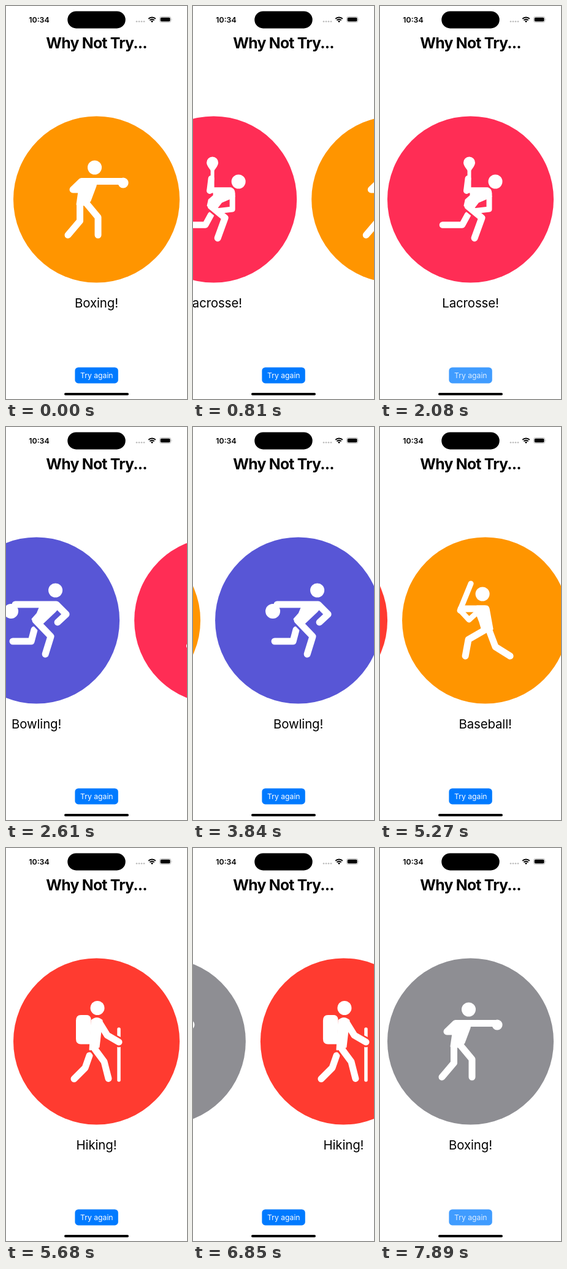
These frames come from a looping animation (295x640 px, 8 s). An HTML page:

```html
<!DOCTYPE html>
<html lang="en">
<head>
<meta charset="utf-8">
<title>Why Not Try...</title>
<style>
html, body { margin: 0; width: 100%; height: 100%; overflow: hidden; background: #fff; }
svg { display: block; width: 100vw; height: 100vh; }
text { font-family: Inter, Roboto, sans-serif; font-optical-sizing: none; text-anchor: middle; }
.line { fill: none; stroke: #fff; stroke-width: 11; stroke-linecap: round; stroke-linejoin: round; }
.gap { stroke: currentColor; stroke-width: 17; }
.solid { fill: #fff; stroke: #fff; stroke-width: 3; stroke-linejoin: round; }
.name { font-size: 20.4px; letter-spacing: -.005em; }
.title { font-size: 24.8px; font-weight: 700; letter-spacing: -.03em; }
.clock { font-size: 12.4px; font-weight: 600; }
.label { font-size: 12.2px; fill: #fff; }
.pressed rect { fill: #409cff; }
.pressed text { fill: #dcedff; }
</style>
</head>
<body>
<svg viewBox="0 0 295 640">
  <g id="slides"></g>
  <text class="clock" x="54" y="26.6">10:34</text>
  <rect x="100.3" y="8.4" width="94.4" height="28" rx="14"/>
  <g fill="#bdbdbd">
    <circle cx="213" cy="25.3" r="1.3"/><circle cx="217" cy="25.3" r="1.3"/>
    <circle cx="221" cy="25.3" r="1.3"/><circle cx="225" cy="25.3" r="1.3"/>
  </g>
  <g fill="none" stroke="#000" stroke-width="2">
    <path d="M232.2 20.9a8.2 8.2 0 0 1 11.6 0M234.4 23.3a5 5 0 0 1 7.2 0"/>
    <path d="M238 26.9l-2-2.1a2.9 2.9 0 0 1 4 0z" fill="#000" stroke="none"/>
  </g>
  <rect x="250.4" y="17.4" width="18.4" height="9.2" rx="3" fill="none" stroke="#aaa" stroke-width=".8"/>
  <rect x="251.7" y="18.7" width="15.8" height="6.6" rx="1.8"/>
  <path d="M269.8 20.4q1.4 1.6 0 3.2z" fill="#aaa"/>
  <text class="title" x="147.5" y="69">Why Not Try...</text>
  <g id="button">
    <rect x="112.4" y="588.4" width="70.4" height="26" rx="5.5" fill="#007aff"/>
    <text class="label" x="147.8" y="606">Try again</text>
  </g>
  <rect x="95" y="630" width="105" height="4" rx="2"/>
</svg>
<script>
const line = (d, w = 11) => `<path class="line" d="${d}" style="stroke-width:${w}"/>`;
const gap = d => `<path class="line gap" d="${d}"/>`;
const solid = d => `<path class="solid" d="${d}"/>`;
const dot = (x, y, r = 11.5) => `<circle cx="${x}" cy="${y}" r="${r}" fill="#fff"/>`;

// Leg drawn over a gap that separates it from whatever lies behind
const frontLeg = d => gap(d) + line(d);

const boxing = dot(144.5, 263) + dot(191, 288, 8.6) +
  line("M191 285.5H123L109 299H122") +
  solid("M124 283H148L146 293 137 317 131 324 116 323 119 302Z") +
  line("M120.5 322V350L101 373") + line("M130 320L150 344V373");

const lacrosse = dot(188, 286) +
  solid("M145.5 270C143 264 137.5 261 137.5 255A8 8 0 0 1 153.5 255C153.5 261 148 264 145.5 270Z") +
  line("M145.5 264V299", 6) + line("M141 301L143.5 281", 10) +
  line("M143 340L134 356.5H102", 10.5) + frontLeg("M143 326L166 345 154 378") +
  line("M141 300H174Q178 300 178 305V331L152 334", 9) +
  solid("M148 297H176L181 310 160 319 150 332 138 325 140 316 148 309Z");

const bowling = dot(178.5, 266) + dot(106, 300, 12) +
  line("M109 349H139L144 330") + frontLeg("M146 315L171 341 162 370") +
  line("M113 289H180L196 305 182 318") +
  solid("M154 292H185L177 301 158 319 146 320 141 313 149 304Z");

const baseball = dot(143, 272) +
  line("M124 255L106 299", 9) + line("M107 299L121 314 132 304", 9) +
  line("M108 296H147") +
  solid("M134 292H149Q152 292 153 296L159 329 144 335 139 318 134 305Z") +
  line("M146 331L120 346 115 373") + line("M153 329L164 358 188 373");

const hiking = dot(149, 260.5) +
  solid("M122 273.5H131Q136 273.5 137 278L136 318H122Q115.500 318 115.500 311V281Q115.500 273.500 122 273.500Z") +
  line("M136 338L129 358 111 376") + frontLeg("M143 325L160 348 167 375.500") +
  line("M184 295V378", 5.5) + gap("M168 308L184 316") +
  line("M152 284L165 305 184 316") +
  solid("M140 281Q148 274 156 281L151 324 137 328Z");

const slides = [
  ["Boxing", "#ff9500", boxing], ["Lacrosse", "#ff2d55", lacrosse],
  ["Bowling", "#5856d6", bowling], ["Baseball", "#ff9500", baseball],
  ["Hiking", "#ff3b30", hiking], ["Boxing", "#8e8e93", boxing]
];
const WIDTH = 295, LOOP = 8000, STEP = 104, STEPS = 5;
const starts = [500, 2300, 3720, 5160, 6630];
const presses = [[500, 600], [2080, 2300], [3460, 3720], [4870, 5160], [6460, 6630], [7890, LOOP]];

const holder = document.getElementById("slides");
const button = document.getElementById("button");
holder.innerHTML = slides.map(([name, color, figure]) => `<g style="color:${color}">
  <circle cx="147.5" cy="315" r="135.5" fill="currentColor"/>${figure}
  <text class="name" x="147.5" y="491" fill="#000">${name}!</text></g>`).join("");

// cubic-bezier(.42, 0, .58, 1)
function easeInOut(x) {
  let lo = 0, hi = 1;
  for (let i = 0; i < 24; i++) {
    const s = (lo + hi) / 2, r = 1 - s;
    if (1.26 * s * r * r + 1.74 * s * s * r + s ** 3 < x) lo = s; else hi = s;
  }
  return lo * lo * (3 - 2 * lo);
}

// The slide advances in discrete steps; the first one runs slightly late
function progress(t, i) {
  const step = Math.floor((t - starts[i] + 12) / STEP);
  if (step >= STEPS) return 1;
  return easeInOut(Math.max(0, step / STEPS - (i ? 0 : .033)));
}

function draw() {
  const t = performance.now() % LOOP;
  const index = starts.filter(s => t >= s).length;
  const p = index ? progress(t, index - 1) : 1;
  [...holder.children].forEach((g, i) => {
    const x = i === index ? p - 1 : i === index - 1 ? p : 1;
    g.style.display = x < 1 ? "" : "none";
    g.setAttribute("transform", `translate(${x * WIDTH} 0)`);
  });
  button.classList.toggle("pressed", presses.some(([a, b]) => t >= a && t < b));
  requestAnimationFrame(draw);
}
draw();
</script>
</body>
</html>
```
